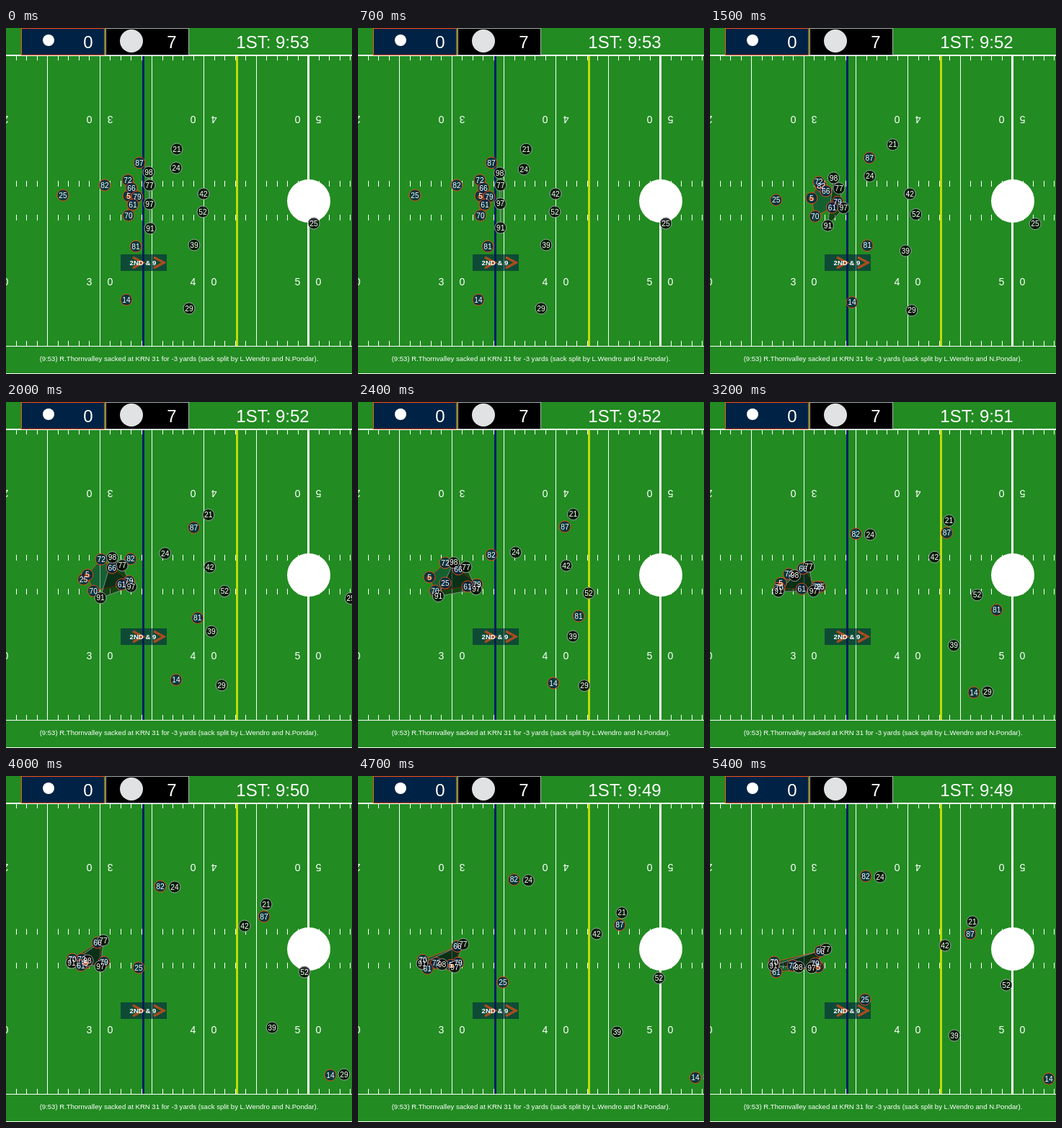
These frames come from a looping animation (480 by 480 pixels, 5.5 s). An HTML page with a canvas:

```html
<!DOCTYPE html>
<html lang="en">
<head>
<meta charset="utf-8">
<title>Football play</title>
<style>
  html, body { margin: 0; width: 100%; height: 100%; overflow: hidden; background: #228b22; }
  canvas { display: block; width: 480px; height: 480px; }
</style>
</head>
<body>
<canvas id="stage" width="480" height="480"></canvas>
<script>
const ctx = document.getElementById('stage').getContext('2d');
const LOOP = 5500, STEP = 100;
const GREEN = '#228b22', NAVY = '#002244', ORANGE = '#fb4f14', SILVER = '#a5acaf';
const FONT = '"Liberation Sans", Arial, sans-serif';

// Seconds: the snap, then the moments a runner reaches his next points.
const TIMES = [0.7, 2.4, 4, 5.4];
const COVERED = 3.2;

const HOME = { fill: 'rgba(0,34,68,.8)', edge: ORANGE, hull: 'rgba(0,34,68,.4)' };
const AWAY = { fill: 'rgba(0,0,0,.8)', edge: SILVER, hull: 'rgba(0,0,0,.5)' };
const players = [];

function slope(path, axis, i) {
  const last = path.length - 1;
  const secant = k => (path[k + 1][axis] - path[k][axis]) / (TIMES[k + 1] - TIMES[k]);
  if (i === 0) return 0;
  if (i === last) return secant(last - 1);
  const before = TIMES[i] - TIMES[i - 1], after = TIMES[i + 1] - TIMES[i];
  return (secant(i - 1) * after + secant(i) * before) / (before + after);
}

// Smooth run from rest through the points; after the last one it goes straight on.
function follow(path, time) {
  if (time <= TIMES[0]) return path[0];
  const last = path.length - 1;
  let i = 0;
  while (i < last && time >= TIMES[i + 1]) i++;
  return [0, 1].map(axis => {
    const a = path[i][axis], va = slope(path, axis, i);
    if (i === last) return a + va * (time - TIMES[i]);
    const b = path[i + 1][axis], vb = slope(path, axis, i + 1);
    const h = TIMES[i + 1] - TIMES[i], u = (time - TIMES[i]) / h;
    return a + u * u * (3 - 2 * u) * (b - a) + h * u * (1 - u) * (va * (1 - u) - vb * u);
  });
}

function add(team, number, inLine, at) {
  const player = { team, number, inLine, at };
  players.push(player);
  return player;
}

const run = (team, number, ...path) => add(team, number, false, time => follow(path, time));
const block = (number, ...path) => add(HOME, number, true, time => follow(path, time));

// A defender closes the gap to his man.
function cover(number, man, wide, tight, react = 0.2) {
  return add(AWAY, number, man.inLine, time => {
    const u = Math.min(1, Math.max(0, (time - react) / (COVERED - react)));
    const ease = u * u * (3 - 2 * u);
    return man.at(time).map((v, axis) => v + wide[axis] + (tight[axis] - wide[axis]) * ease);
  });
}

run(HOME, 25, [79, 232], [121, 251], [184, 266], [215, 310]);
run(HOME, 81, [180, 303], [306, 297], [495, 279], [640, 266]);
const slot = run(HOME, 82, [137, 218], [185, 212], [214, 153], [216, 139]);
const end = run(HOME, 87, [185, 187], [287, 173], [358, 195], [361, 219]);
const wideout = run(HOME, 14, [167, 377], [271, 390], [450, 415], [470, 420]);

const passer = block(5, [170, 233], [99, 243], [111, 259], [150, 265]);
const leftTackle = block(72, [169, 211], [121, 223], [105, 254], [115, 263]);
const leftGuard = block(66, [174, 222], [139, 232], [127, 231], [153, 243]);
const center = block(79, [182, 234], [165, 253], [136, 258], [146, 260]);
block(61, [176, 245], [152, 256], [104, 263], [92, 272]);
const rightTackle = block(70, [170, 260], [107, 262], [92, 254], [89, 258]);

cover(21, end, [52, -19], [3, -17]);
cover(24, slot, [99, -24], [20, 1]);
cover(29, wideout, [87, 12], [19, -1], 1.2);
cover(98, leftTackle, [29, -11], [8, 2]);
cover(77, leftGuard, [25, -4], [8, -3]);
cover(97, center, [17, 10], [-5, 6]);
cover(91, rightTackle, [30, 18], [-1, 5]);
run(AWAY, 42, [274, 230], [289, 227], [331, 208], [326, 235]);
run(AWAY, 52, [273, 255], [320, 265], [414, 272], [411, 290]);
run(AWAY, 39, [261, 301], [298, 325], [369, 349], [339, 360]);
run(AWAY, 25, [427, 271], [498, 273]);

function convexHull(points) {
  const sorted = [...points].sort((a, b) => a[0] - b[0] || a[1] - b[1]);
  const cross = (o, a, b) => (a[0] - o[0]) * (b[1] - o[1]) - (a[1] - o[1]) * (b[0] - o[0]);
  const chain = list => {
    const out = [];
    for (const p of list) {
      while (out.length > 1 && cross(out[out.length - 2], out[out.length - 1], p) <= 0) out.pop();
      out.push(p);
    }
    return out.slice(0, -1);
  };
  return [...chain(sorted), ...chain([...sorted].reverse())];
}

function text(string, x, y, size, weight = '') {
  ctx.font = `${weight} ${size}px ${FONT}`;
  ctx.textAlign = 'center';
  ctx.fillStyle = '#fff';
  ctx.fillText(string, x, y + size * 0.358);
}

function line(points, color, width = 1) {
  ctx.strokeStyle = color;
  ctx.lineWidth = width;
  ctx.beginPath();
  points.forEach(([x, y]) => ctx.lineTo(x, y));
  ctx.stroke();
}

function disc(x, y, radius, fill) {
  ctx.fillStyle = fill;
  ctx.beginPath();
  ctx.arc(x, y, radius, 0, Math.PI * 2);
  ctx.fill();
}

function box(x, y, w, h, fill, edge) {
  ctx.fillStyle = fill;
  ctx.fillRect(x, y, w, h);
  if (!edge) return;
  ctx.strokeStyle = edge;
  ctx.lineWidth = 1;
  ctx.strokeRect(x + 0.5, y + 0.5, w - 1, h - 1);
}

const yardX = yard => Math.floor(130.2 + 14.47 * (yard - 30)) + 0.5;
const vertical = (x, top, bottom, color = '#fff', width = 1) =>
  line([[x, top], [x, bottom]], color, width);

function drawField() {
  box(0, 0, 480, 480, GREEN);
  for (let yard = 21; yard <= 54; yard++) {
    const x = yardX(yard);
    if (yard % 5 === 0) {
      vertical(x, 39, 441, '#fff', yard === 50 ? 3 : 1);
    } else {
      [[39, 45], [212, 220], [259, 267], [434, 441]].forEach(([a, b]) => vertical(x, a, b));
    }
  }
  line([[0, 38], [480, 38]], '#fff', 2);
  line([[0, 441.5], [480, 441.5]], '#fff');
  line([[0, 479.5], [480, 479.5]], '#fff');

  for (let yard = 20; yard <= 50; yard += 10) {
    const x = yardX(yard), tens = yard / 10;
    text(tens, x - 15, 352, 14.2);
    text(0, x + 14, 352, 14.2);
    ctx.save();
    ctx.translate(x, 127);
    ctx.rotate(Math.PI);
    text(tens, -14, 0, 14.2);
    text(0, 15, 0, 14.2);
    ctx.restore();
  }
  disc(420, 240, 30, '#fff');
}

function drawMarkers() {
  vertical(190.5, 39, 441, '#002060', 3);
  vertical(320.5, 39, 441, 'rgba(255,255,0,.7)', 3);
  box(159, 314, 64, 23, 'rgba(0,34,68,.6)');
  for (const x of [176, 205]) {
    line([[x, 318], [x + 14, 325.5], [x, 333]], 'rgba(251,79,20,.65)', 3.5);
  }
  text('2ND & 9', 190, 325.5, 9.6, 'bold');
}

function drawScoreboard(time) {
  box(21, 0, 116, 38, NAVY, ORANGE);
  box(138, 0, 116, 38, '#000', SILVER);
  disc(59, 17, 8, '#fff');
  disc(174, 18, 16, '#e0e2e3');
  text(0, 114, 19, 24);
  text(7, 230, 19, 24);
  text(`1ST: 9:${53 - Math.max(0, Math.floor(time - 0.5))}`, 370, 19, 24);
  text('(9:53) R.Thornvalley sacked at KRN 31 for -3 yards (sack split by L.Wendro and N.Pondar).',
    240, 459, 9.57);
}

function drawPlayers(time) {
  for (const player of players) player.spot = player.at(time);

  for (const team of [HOME, AWAY]) {
    const linemen = players.filter(player => player.team === team && player.inLine);
    const hull = convexHull(linemen.map(player => player.spot));
    line([...hull, hull[0]], team.edge);
    ctx.fillStyle = team.hull;
    ctx.fill();
  }
  for (const { team, spot } of players) {
    disc(...spot, 8, team.fill);
    ctx.strokeStyle = team.edge;
    ctx.lineWidth = 0.9;
    ctx.stroke();
  }
  const [x, y] = passer.spot;
  ctx.fillStyle = '#a0461e';
  ctx.beginPath();
  ctx.ellipse(x, y + 1, 4, 3, 0, 0, Math.PI * 2);
  ctx.fill();
  for (const { number, spot } of players) text(number, ...spot, 10.3);
}

function frame(now) {
  const time = Math.floor((now % LOOP) / STEP) * STEP / 1000;
  drawField();
  drawMarkers();
  drawScoreboard(time);
  drawPlayers(time);
  requestAnimationFrame(frame);
}
frame(performance.now());
</script>
</body>
</html>
```
